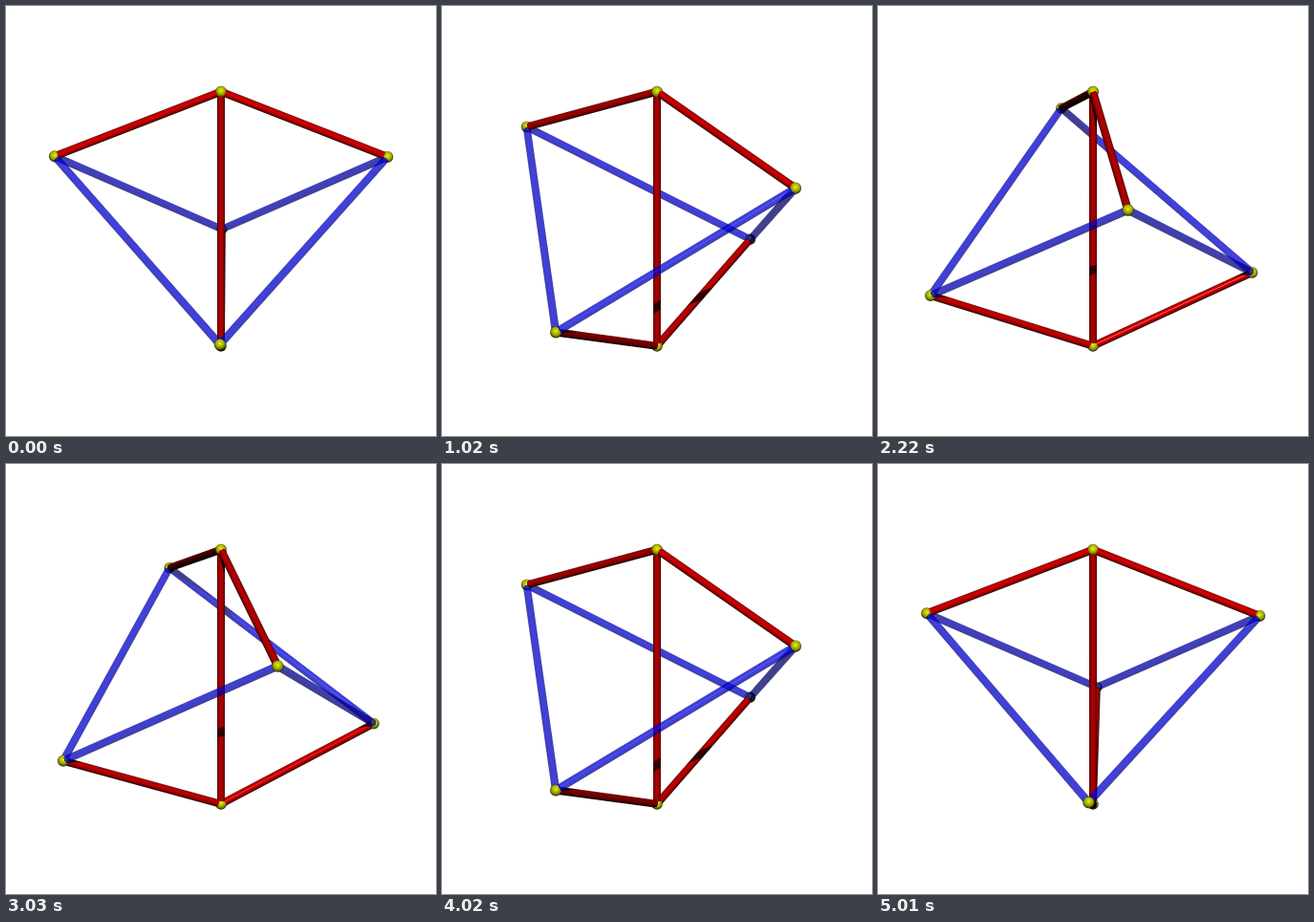
Animation, 450 px wide and 450 px high, one loop 5040 ms. Source, as an HTML page with a canvas:

```html
<!DOCTYPE html>
<html lang="en">
<head>
<meta charset="utf-8">
<title>Rotating rod model</title>
<style>
  html, body { margin: 0; height: 100%; overflow: hidden; background: #fff; }
  canvas { display: block; }
</style>
</head>
<body>
<canvas width="450" height="450"></canvas>
<script>
const SIZE = 450, STEP = 30, STEPS = 168;
const DIST = 3200, CX = 225, CY = 224.7;          // camera distance, picture centre
const RADIUS = 173, TOP = 141, MID = 70.6;        // model proportions
const CAMERA_TILT = 0.331, LIGHT_TILT = 0.271;    // sines of the pitch angles
const LIGHT = [0, LIGHT_TILT, Math.sqrt(1 - LIGHT_TILT ** 2)];

const RED = { color: [208, 0, 0], ambient: 0.05, alpha: 1, block: 1, shine: 0.45 };
const BLUE = { color: [0, 0, 218], ambient: 0.45, alpha: 0.75, block: 0.75, shine: 0.45 };
const YELLOW = { color: [205, 217, 0], ambient: 0.1, alpha: 1, block: 1, shine: 0.35 };

// Vertices: 0 top, 1 bottom, 2-3 upper pair, 4-5 lower pair. A ball is a rod of no length.
const rods = (mat, pairs) => pairs.map(([i, j]) => ({ i, j, mat, rad: 4 }));
const parts = [
  ...rods(RED, [[0, 1], [0, 2], [0, 3], [1, 4], [1, 5]]),
  ...rods(BLUE, [[2, 4], [4, 3], [3, 5], [5, 2]]),
  ...[0, 1, 2, 3, 4, 5].map(i => ({ i, j: i, mat: YELLOW, rad: 5.8 })),
];

const ctx = document.querySelector('canvas').getContext('2d');
const image = ctx.createImageData(SIZE, SIZE);
const clamp = v => Math.max(0, Math.min(1, v));
const dot = (a, b) => a[0] * b[0] + a[1] * b[1] + a[2] * b[2];
const unit = a => { const m = Math.hypot(...a); return a.map(v => v / m); };
const mix = (a, b, t) => a.map((v, n) => v + (b[n] - v) * t);

function tilt([x, y, z], s) {
  const c = Math.sqrt(1 - s * s);
  return [x, y * c - z * s, y * s + z * c];
}

function project([x, y, z]) {
  const k = DIST / (DIST - z);
  return [CX + x * k, CY - y * k, k];
}

function vertices(angle) {
  const c = RADIUS * Math.cos(angle), s = RADIUS * Math.sin(angle);
  return [
    [0, TOP, 0], [0, -TOP, 0],
    [-c, MID, -s], [c, MID, s],
    [-s, -MID, c], [s, -MID, -c],
  ].map(p => tilt(p, CAMERA_TILT));
}

// Share of light that reaches a point, judged in the light's own view.
function lightAt(pos, self, lit) {
  const [x, y, z] = tilt(pos, LIGHT_TILT);
  let share = 1;
  for (const part of parts) {
    if (part === self) continue;
    const a = lit[part.i], b = lit[part.j];
    const dx = b[0] - a[0], dy = b[1] - a[1];
    const t = clamp(((x - a[0]) * dx + (y - a[1]) * dy) / (dx * dx + dy * dy || 1));
    if (a[2] + (b[2] - a[2]) * t < z + 1) continue;
    const gap = Math.hypot(x - a[0] - dx * t, y - a[1] - dy * t);
    share *= 1 - part.mat.block * clamp(part.rad - gap + 0.5);
  }
  return share;
}

function shade(pos, normal, part, lit) {
  const { color, ambient, shine } = part.mat;
  const facing = Math.max(0, dot(normal, LIGHT));
  const share = facing ? lightAt(pos, part, lit) : 0;
  const view = unit([-pos[0], -pos[1], DIST - pos[2]]);
  const half = unit(LIGHT.map((v, n) => v + view[n]));
  const glow = 255 * shine * share * Math.max(0, dot(normal, half)) ** 200;
  const level = ambient + (1 - ambient) * facing * share;
  return color.map(v => Math.min(255, v * level + glow));
}

// Surface of one part under a pixel: coverage, normal and position.
function ballSurface(pts) {
  return part => {
    const c = pts[part.i], [sx, sy, k] = project(c), size = part.rad * k;
    return (px, py) => {
      const ex = px - sx, ey = sy - py, d = Math.hypot(ex, ey);
      if (d > size + 0.5) return null;
      const m = Math.max(size, d);
      const normal = [ex / m, ey / m, Math.sqrt(1 - Math.min(1, (d / m) ** 2))];
      return { cover: clamp(size - d + 0.5), normal, base: c };
    };
  };
}

function rodSurface(pts) {
  return part => {
    const a = pts[part.i], b = pts[part.j];
    const [ax, ay, ka] = project(a), [bx, by, kb] = project(b);
    const len = Math.hypot(bx - ax, by - ay);
    const sx = (bx - ax) / len, sy = (ay - by) / len;
    const uz = unit(b.map((v, n) => v - a[n]))[2], flat = Math.sqrt(1 - uz * uz);
    const side = [-sy, sx, 0], out = [-uz * sx, -uz * sy, flat];
    const da = DIST - a[2], db = DIST - b[2];
    return (px, py) => {
      const x = px - ax, y = ay - py, e = y * sx - x * sy;
      if (Math.abs(e) > 6) return null;
      const along = x * sx + y * sy;
      const size = part.rad * (ka + (kb - ka) * clamp(along / len));
      if (Math.abs(e) > size + 0.5) return null;
      const s = Math.max(-1, Math.min(1, e / size)), w = Math.sqrt(1 - s * s);
      const t = (along + size * w * uz) / len;
      if (t < 0 || t > 1) return null;
      return {
        cover: clamp(size - Math.abs(e) + 0.5),
        normal: side.map((v, n) => v * s + out[n] * w),
        base: mix(a, b, t * da / (db + t * (da - db))),
      };
    };
  };
}

function draw(angle) {
  const pts = vertices(angle), lit = pts.map(p => tilt(p, LIGHT_TILT));
  const screen = pts.map(project), ball = ballSurface(pts), rod = rodSurface(pts);
  const dabs = [];
  for (const part of parts) {
    const surface = (part.i === part.j ? ball : rod)(part);
    const [ax, ay] = screen[part.i], [bx, by] = screen[part.j];
    const right = Math.max(ax, bx) + 8, low = Math.max(ay, by) + 8;
    for (let y = Math.floor(Math.min(ay, by) - 8); y < low; y++) {
      for (let x = Math.floor(Math.min(ax, bx) - 8); x < right; x++) {
        const hit = surface(x + 0.5, y + 0.5);
        if (!hit) continue;
        const pos = hit.base.map((v, n) => v + part.rad * hit.normal[n]);
        dabs.push({
          z: pos[2], at: (y * SIZE + x) * 4,
          alpha: hit.cover * part.mat.alpha,
          color: shade(pos, hit.normal, part, lit),
        });
      }
    }
  }
  dabs.sort((p, q) => p.z - q.z);
  const data = image.data.fill(255);
  for (const { at, alpha, color } of dabs)
    for (let n = 0; n < 3; n++) data[at + n] += (color[n] - data[at + n]) * alpha;
  ctx.putImageData(image, 0, 0);
}

const start = performance.now();
let shown = -1;
function tick() {
  const step = Math.floor((performance.now() - start) / STEP) % STEPS;
  if (step !== shown) {
    shown = step;
    const swing = Math.min(step, STEPS - step);   // forth and back
    draw((0.35 + 1.056 * swing) * Math.PI / 180);
  }
  requestAnimationFrame(tick);
}
tick();
</script>
</body>
</html>
```
